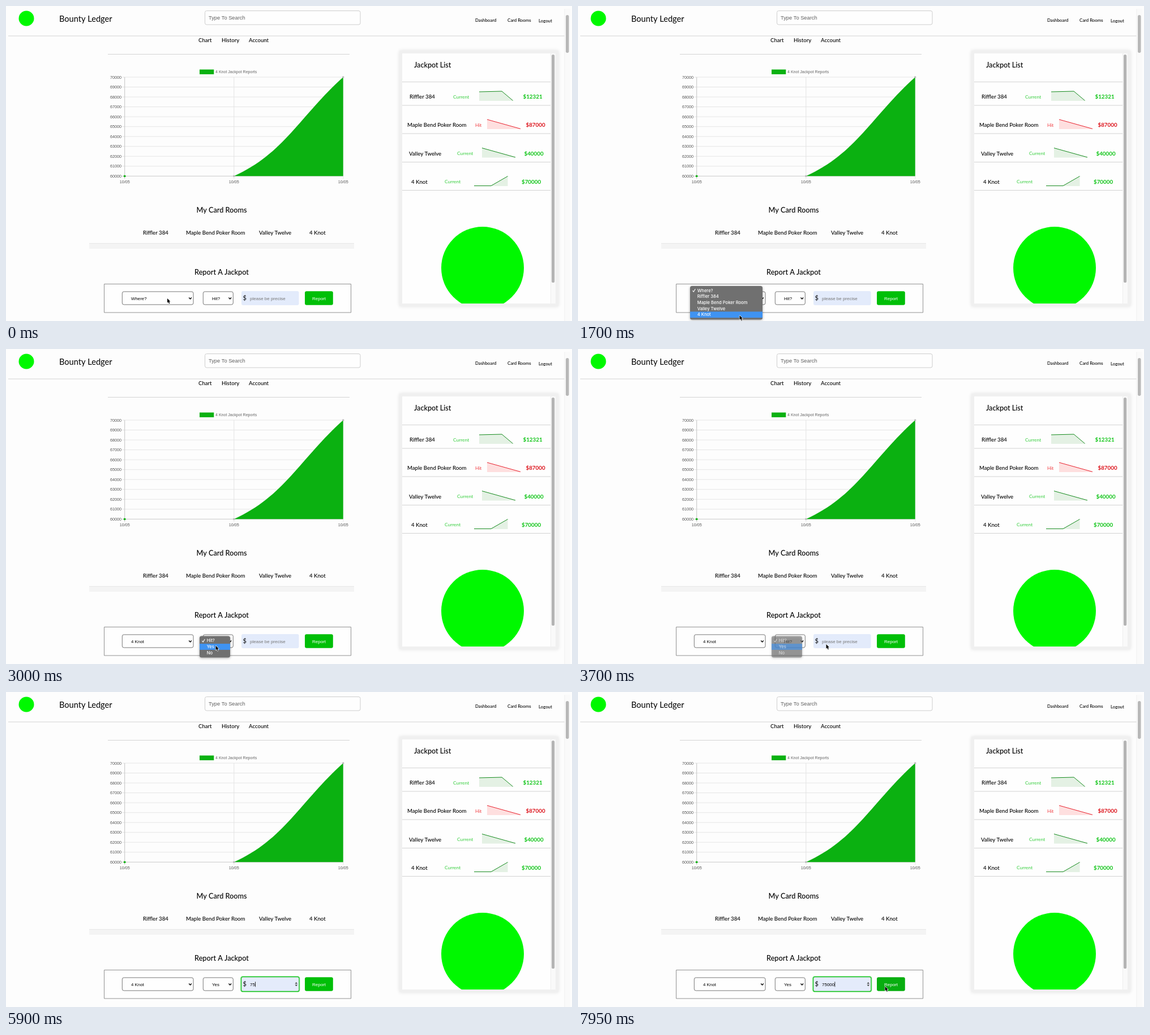
These frames come from a looping animation (1000x558 px, 8000 ms). An HTML page with a canvas:

```html
<!DOCTYPE html>
<html lang="en">
<head>
<meta charset="utf-8">
<title>Jackpot reports</title>
<style>
html, body { margin: 0; width: 100%; height: 100%; overflow: hidden; background: #fdfdfd; }
canvas { display: block; width: 1000px; height: 558px; }
</style>
</head>
<body>
<canvas id="stage"></canvas>
<script>
const LOOP = 8000, STEP = 50, W = 1000, H = 558;
const canvas = document.getElementById('stage');
const ctx = canvas.getContext('2d');
const ratio = window.devicePixelRatio || 1;
canvas.width = W * ratio;
canvas.height = H * ratio;

const UI = 'Lato, "Open Sans", sans-serif';
const FORM = '"Liberation Sans", Arial, sans-serif';
const MENU = 'Inter, Roboto, sans-serif';
const GREEN = '#00bf08', INK = '#000', RULE = '#d3d3d3';

const BRAND = 'Bounty Ledger';
const ROOMS = ['Riffler 384', 'Maple Bend Poker Room', 'Valley Twelve', '4 Knot'];
const LIST = [
  { y: 161, x: 713, status: 'Current', sx: 790, amount: '$12321', ax: 913.5, line: [[836, 152], [876, 151], [895.5, 167.5]] },
  { y: 211, x: 709, status: 'Hit', sx: 829, amount: '$87000', ax: 918.5, line: [[850, 201], [909, 217.5]], hit: true },
  { y: 261.5, x: 712, status: 'Current', sx: 797, amount: '$40000', ax: 915.5, line: [[841, 251.5], [900, 268]] },
  { y: 311.5, x: 716, status: 'Current', sx: 775, amount: '$70000', ax: 911, line: [[827, 318.5], [857, 318.5], [886.5, 301.5]] }
];

// Pointer tip over time: [ms, x, y]
const POINTER = [
  [0, 284.5, 517.5], [400, 284.5, 517.5], [700, 285, 547.5], [1800, 285, 547.5],
  [2050, 346, 521], [2350, 372, 517], [2600, 372, 517], [2850, 370, 525],
  [3500, 370, 525], [3700, 438, 522.5], [4250, 465, 517], [6900, 465, 517],
  [7300, 540, 530], [7750, 542, 521], [8000, 542, 521]
];
const KEYS = [[5600, '7'], [5750, '75'], [6150, '750'], [6350, '7500'], [6600, '75000']];
const ROOM_MENU = { open: 200, scroll: 900, close: 1700, end: 1850 };
const HIT_MENU = { open: 2500, hover: 2750, close: 3600, end: 3850 };
const FOCUS = 4450;

const clamp = v => Math.max(0, Math.min(1, v));
const smooth = v => v * v * (3 - 2 * v);
const within = (t, a, b) => t >= a && t < b;

function text(str, x, y, size, font = UI, color = INK, weight = 400, align = 'left') {
  ctx.font = `${weight} ${size}px ${font}`;
  ctx.fillStyle = color;
  ctx.textAlign = align;
  ctx.textBaseline = 'alphabetic';
  ctx.fillText(str, x, y + size * 0.35);
}

function rect(x, y, w, h, fill) {
  ctx.fillStyle = fill;
  ctx.fillRect(x, y, w, h);
}

function box(x, y, w, h, r, fill, stroke, width = 1) {
  ctx.beginPath();
  ctx.roundRect(x, y, w, h, r);
  if (fill) { ctx.fillStyle = fill; ctx.fill(); }
  if (stroke) { ctx.strokeStyle = stroke; ctx.lineWidth = width; ctx.stroke(); }
}

function path(points, color, width = 1) {
  ctx.beginPath();
  points.forEach(p => ctx.lineTo(...p));
  ctx.strokeStyle = color;
  ctx.lineWidth = width;
  ctx.stroke();
}

function polygon(points, fill) {
  ctx.beginPath();
  points.forEach(p => ctx.lineTo(...p));
  ctx.closePath();
  ctx.fillStyle = fill;
  ctx.fill();
}

function disc(x, y, r, fill) {
  ctx.beginPath();
  ctx.arc(x, y, r, 0, Math.PI * 2);
  ctx.fillStyle = fill;
  ctx.fill();
}

function drawHeader() {
  disc(36, 22, 13.5, '#00f800');
  text(BRAND, 94, 23, 14.6);
  box(351.5, 8.5, 274.5, 24.5, 3, '#fefefe', '#cdcdcd');
  text('Type To Search', 358, 20.5, 9.3, FORM, '#5f5f5f');
  text('Dashboard', 829, 25.5, 7.8, UI, INK, 500);
  text('Card Rooms', 886, 25.5, 7.8, UI, INK, 500);
  text('Logout', 941, 26, 7.8, UI, INK, 500);
  rect(4, 52.5, 983, 1, '#d4d4d4');
  rect(986.5, 5, 1, 553, '#ebebeb');
  rect(987.5, 5, 9, 553, '#fafafa');
  box(989, 16, 5.5, 67, 2.7, '#b8b8b8');
}

function drawChart() {
  const left = 209.7, mid = 402.8, right = 595.7, top = 126, bottom = 301.3;
  text('Chart', 340, 60.5, 9.6, UI, INK, 500);
  text('History', 381, 60.5, 9.6, UI, INK, 500);
  text('Account', 429, 60.5, 9.6, UI, INK, 500);
  rect(180, 85, 427, 1, RULE);
  rect(342, 112.5, 25.3, 8.4, '#0bb111');
  text(ROOMS[3] + ' Jackpot Reports', 370, 116.8, 7.05, FORM, '#666');

  for (let i = 0; i <= 10; i++) {
    const y = top + i * (bottom - top) / 10;
    path([[205, y], [right, y]], i === 10 ? '#c4c4c4' : '#e4e4e4', 0.9);
    text(String(70000 - i * 1000), 204, y, 7.2, FORM, '#555', 400, 'right');
  }
  [left, mid, right].forEach((x, i) => {
    path([[x, top], [x, bottom + 5]], i ? '#e2e2e2' : '#bdbdbd', 0.9);
    text('10/05', x, 311.5, 7.2, FORM, '#555', 400, 'center');
  });

  ctx.beginPath();
  ctx.moveTo(mid, bottom);
  ctx.bezierCurveTo(491.6, 261, 518.5, 196, right, top);
  ctx.lineTo(right, bottom);
  ctx.closePath();
  ctx.fillStyle = '#0bb111';
  ctx.fill();
  disc(left, bottom, 1.9, '#0bb111');
  disc(mid, bottom, 1.8, '#bcbcbc');
  disc(right, top, 1.8, '#bcbcbc');
}

function drawRooms() {
  text('My Card Rooms', 381, 362, 12.7, UI, INK, 500, 'center');
  [242, 318, 447, 536].forEach((x, i) => text(ROOMS[i], x, 401.5, 9.6, UI, INK, 500));
  rect(147, 420, 468, 10, '#f4f4f4');
  rect(147, 420, 468, 1, '#e8e8e8');
  text('Report A Jackpot', 381, 472, 12.7, UI, INK, 500, 'center');
}

function drawPanel() {
  ctx.save();
  ctx.shadowColor = 'rgba(0,0,0,.11)';
  ctx.shadowBlur = 6 * ratio;
  box(695, 79, 281, 453, 1, '#f0f0f0');
  ctx.restore();
  rect(700, 84, 270.5, 443, '#fefefe');
  rect(962, 84, 8.5, 443, '#f9f9f9');
  rect(962, 84, 0.7, 443, '#e8e8e8');
  box(964, 86, 5.2, 404, 2.6, '#b4b4b4');
  text('Jackpot List', 721, 105, 12.6, UI, INK, 500);
  [134, 175.5, 225.5, 276, 326].forEach(y => rect(700, y, 262, 1, RULE));

  LIST.forEach((row, i) => {
    const first = row.line[0], last = row.line[row.line.length - 1];
    const base = Math.max(...row.line.map(p => p[1])) + 0.5;
    text(ROOMS[i], row.x, row.y, 9.6, UI, INK, 500);
    text(row.status, row.sx, row.y, 8.4, UI, row.hit ? '#f0383d' : '#32cd3a');
    polygon([...row.line, [last[0], base], [first[0], base]],
      row.hit ? 'rgba(255,0,0,.12)' : 'rgba(0,128,0,.1)');
    path(row.line, row.hit ? '#e8202c' : '#148a1c', 1);
    text(row.amount, row.ax, row.y, 9.8, UI, row.hit ? '#dc1018' : '#0cc414', 700);
  });

  ctx.save();
  ctx.beginPath();
  ctx.rect(700, 327, 262, 200);
  ctx.clip();
  disc(842, 464, 73, '#00f800');
  ctx.restore();
}

function drawSelect(x, w, label, focused) {
  box(x, 506, w, 23, 3, '#fefefe', focused ? '#1467c8' : '#777', focused ? 1.9 : 1);
  text(label, x + 15.7, 517.8, 7.9, FORM);
  const cx = x + w - 5.5;
  path([[cx - 2.3, 516.5], [cx, 519], [cx + 2.3, 516.5]], INK, 1.3);
}

function drawField(t) {
  const typed = KEYS.filter(k => t >= k[0]).pop() || [FOCUS, ''];
  const focused = t >= FOCUS;
  if (focused) {
    box(414.8, 503.8, 103.9, 27.4, 3.5, null, 'rgba(40,220,50,.45)', 1.6);
    box(415.6, 504.6, 102.3, 25.8, 3, '#e4ebfb', '#12bd1a', 1.2);
  } else {
    box(416, 505, 101.5, 25, 3, '#e3ebfb');
  }
  text('$', 418.5, 517.3, 11);
  if (typed[1]) text(typed[1], 431, 517.8, 8, FORM);
  else text('please be precise', 431, 517.8, 8, FORM, '#757575');
  if (!focused) return;

  polygon([[510.5, 516.8], [512.8, 514], [515.1, 516.8]], '#444');
  polygon([[510.5, 518.4], [512.8, 521.2], [515.1, 518.4]], '#444');
  if ((t - typed[0]) % 1000 < 500) {
    const x = 431 + ctx.measureText(typed[1]).width;
    rect(x + 0.2, 513.3, 0.8, 9, INK);
  }
}

function drawForm(t) {
  box(173.5, 492.5, 436, 50.5, 0, '#fefefe', '#919191');
  drawSelect(205.3, 125.7, t < ROOM_MENU.close ? 'Where?' : ROOMS[3], within(t, ROOM_MENU.end, HIT_MENU.open));
  drawSelect(348.3, 53, t < HIT_MENU.end ? 'Hit?' : 'Yes', within(t, HIT_MENU.end, FOCUS));
  drawField(t);
  box(528, 505.3, 49.8, 24.4, 3, t >= 7700 ? '#08ae10' : GREEN);
  text('Report', 553, 517.8, 8, FORM, '#fff', 400, 'center');
}

function drawMenu(x, y, w, h, rows, rowY, picked, alpha) {
  ctx.save();
  ctx.globalAlpha = alpha;
  ctx.shadowColor = 'rgba(0,0,0,.35)';
  ctx.shadowBlur = 4 * ratio;
  ctx.shadowOffsetY = ratio;
  box(x, y, w, h, 3.5, '#707070');
  ctx.shadowColor = 'transparent';
  rows.forEach((row, i) => {
    const cy = rowY + i * 10.7;
    if (i === picked) rect(x, cy - 5.4, w, 10.8, '#3f93f2');
    text(row, x + 12.7, cy, 7.6, MENU, '#fff', 500);
  });
  path([[x + 4.5, rowY], [x + 6.2, rowY + 2.3], [x + 9.3, rowY - 2.8]], '#fff', 1.1);
  ctx.restore();
}

function drawMenus(t) {
  const fade = menu => 1 - clamp((t - menu.close) / (menu.end - menu.close));
  if (within(t, ROOM_MENU.open, ROOM_MENU.end)) {
    const scrolled = t >= ROOM_MENU.scroll;
    const rows = ['Where?', ...ROOMS.slice(0, scrolled ? 4 : 3)];
    const top = scrolled ? 496 : 498;
    drawMenu(198, top, 128, 555.5 - top, rows, top + 8, scrolled ? 4 : -1, fade(ROOM_MENU));
    if (!scrolled) polygon([[259, 546.3], [265, 546.3], [262, 551.3]], '#fff');
  }
  if (within(t, HIT_MENU.open, HIT_MENU.end)) {
    drawMenu(342, 508.5, 54, 38, ['Hit?', 'Yes', 'No'], 516.8, t >= HIT_MENU.hover ? 1 : 0, fade(HIT_MENU));
  }
}

function drawPointer(t) {
  if (within(t, KEYS[0][0], 6900)) return;
  const next = Math.max(1, POINTER.findIndex(p => p[0] > t));
  const a = POINTER[next - 1], b = POINTER[next];
  const k = smooth(clamp((t - a[0]) / (b[0] - a[0])));
  const x = a[1] + (b[1] - a[1]) * k, y = a[2] + (b[2] - a[2]) * k;

  ctx.save();
  ctx.translate(x, y);
  if (t > 3800 && x > 416 && x < 517) {
    path([[-1.8, -4.8], [0, -4.2], [1.8, -4.8]], '#222', 0.8);
    path([[0, -4.2], [0, 4.2]], '#222', 0.9);
    path([[-1.8, 4.8], [0, 4.2], [1.8, 4.8]], '#222', 0.8);
  } else {
    const arrow = [[0.5, 0.5], [0.5, 8.3], [2.2, 6.8], [3.5, 9.8], [4.9, 9.2], [3.6, 6.3], [5.9, 6.1]];
    ctx.lineJoin = 'round';
    path([...arrow, arrow[0]], '#fff', 1.3);
    polygon(arrow, INK);
  }
  ctx.restore();
}

function draw(now) {
  const t = Math.floor((now % LOOP) / STEP) * STEP;
  ctx.setTransform(ratio, 0, 0, ratio, 0, 0);
  rect(0, 0, W, H, '#fdfdfd');
  drawHeader();
  drawChart();
  drawRooms();
  drawPanel();
  drawForm(t);
  drawMenus(t);
  drawPointer(t);
}

const start = performance.now();
function tick() {
  draw(performance.now() - start);
  requestAnimationFrame(tick);
}
tick();
</script>
</body>
</html>
```
